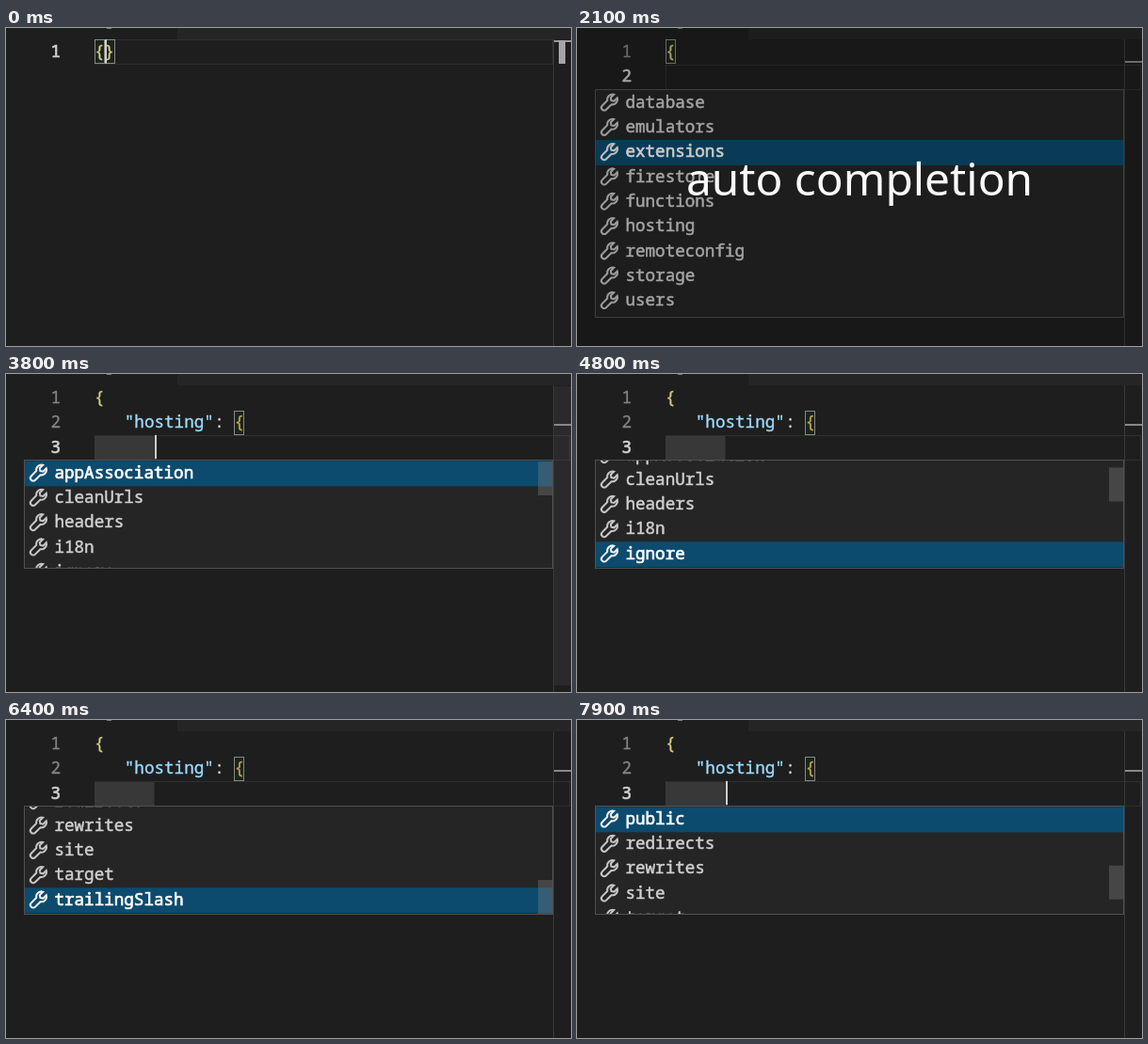
Write an HTML page with a canvas that moves like this. It is 600 px wide and 338 px high and loops after 8000 ms.

```html
<!DOCTYPE html>
<html lang="en">
<head>
<meta charset="utf-8">
<title>Auto completion</title>
<style>
html, body { margin: 0; width: 100%; height: 100%; overflow: hidden; background: #1e1e1e; }
canvas { display: block; width: 600px; height: 338px; }
</style>
</head>
<body>
<canvas id="stage" width="600" height="338"></canvas>
<script>
const ctx = document.getElementById('stage').getContext('2d');
const LOOP = 8000, LINE = 26.3, CHAR = 10.6, LEFT = 94, TOP = 12.3, BASE = 18.7;
const MONO = '17.6px "Noto Sans Mono", monospace';
const GOLD = '#d6cb80', AMBER = '#c9a24e', KEY = '#9cdcfe', PLAIN = '#d4d4d4';

const SECTIONS = ['database', 'emulators', 'extensions', 'firestore', 'functions',
  'hosting', 'remoteconfig', 'storage', 'users'];
const OPTIONS = ['appAssociation', 'cleanUrls', 'headers', 'i18n', 'ignore', 'postdeploy',
  'predeploy', 'public', 'redirects', 'rewrites', 'site', 'target', 'trailingSlash'];

// Times of the arrow key presses
const SECTION_DOWN = [1500, 1900, 2200, 2400, 2500];
const DOWN = [4000, 4300, 4500, 4700, 5000, 5200, 5400, 5500, 5800, 6000, 6200, 6300];
const UP = [6700, 6900, 7100, 7300, 7600];
const ENTER = 300, OPEN = 900, ACCEPT = 2700, BRACE = 2900, SPLIT = 3200, REOPEN = 3500;

const wrench = new Path2D('M14.8 4.2L12 7L9.5 6.5L9 4L11.8 1.2A4.6 4.6 0 0 0 6 6.4' +
  'L1.5 11A2.1 2.1 0 0 0 5 14.5L9.6 10A4.6 4.6 0 0 0 14.8 4.2Z');

const clamp = v => Math.max(0, Math.min(1, v));
const ramp = (t, from, to) => clamp((t - from) / (to - from));
const pulse = (t, a, b, c, d) => ramp(t, a, b) * (1 - ramp(t, c, d));
const countPast = (times, t) => times.filter(k => t >= k).length;
const colX = col => LEFT + col * CHAR;
const lineY = line => TOP + (line - 1) * LINE;

function rect(x, y, w, h, color) {
  ctx.fillStyle = color;
  ctx.fillRect(x, y, w, h);
}

function frame(x, y, w, h, color) {
  ctx.strokeStyle = color;
  ctx.lineWidth = 1;
  ctx.strokeRect(Math.round(x) + 0.5, Math.round(y) + 0.5, Math.round(w), Math.round(h));
}

function text(str, x, y, color, weight = 0.35) {
  ctx.font = MONO;
  ctx.fillStyle = ctx.strokeStyle = color;
  ctx.lineWidth = weight;
  ctx.fillText(str, x, y);
  ctx.strokeText(str, x, y);
}

function code(line, col, str, color) {
  text(str, colX(col), lineY(line) + BASE, color);
}

function brace(line, col, str, color, boxed) {
  if (boxed) {
    rect(colX(col), lineY(line), CHAR, LINE, 'rgba(0,100,0,.1)');
    frame(colX(col), lineY(line), CHAR - 1, LINE - 1, '#888');
  }
  code(line, col, str, color);
}

function cursor(line, col) {
  rect(Math.round(colX(col)), lineY(line), 2, LINE - 1, '#d0d0d0');
}

function drawChrome(t, current, lines) {
  rect(0, 0, 600, 338, '#1e1e1e');
  rect(182, 0, 418, 12, '#252526');
  rect(107, 0, 5, 1, '#777');
  const right = t < OPEN ? 580 : 598;
  frame(LEFT, lineY(current), right - LEFT, LINE, '#2f2f2f');
  for (let i = 1; i <= lines; i++) {
    const active = i === current;
    text(i, 47.4, lineY(i) + BASE, active ? '#d0d0d0' : '#858585', active ? 0.7 : 0.3);
  }
}

function drawMinimap(t) {
  rect(581, 12, 1, 326, '#3a3a3a');
  const slider = 0.24 * pulse(t, 200, 400, 1200, 1700) + 0.13 * pulse(t, 2800, 3000, 3900, 4400);
  rect(582, 13, 18, 318, `rgba(121,121,121,${slider})`);
  if (t < ENTER) {
    rect(582, 13, 18, 2, '#999');
    rect(587, 13, 7, 25, '#a5a5a5');
  } else {
    rect(582, t < SPLIT ? 35 : 53, 18, 2, '#888');
  }
}

function drawCode(t) {
  if (t < ENTER) {
    brace(1, 0, '{', GOLD, true);
    brace(1, 1, '}', GOLD, true);
    cursor(1, 1);
    return;
  }
  const outerBoxed = t < ACCEPT;
  brace(1, 0, '{', GOLD, outerBoxed);
  if (t < SPLIT) brace(3, 0, '}', GOLD, outerBoxed);
  if (t < ACCEPT) return;

  code(2, 3, '"hosting"', KEY);
  code(2, 12, ':', PLAIN);
  if (t < BRACE) {
    cursor(2, 14);
    return;
  }
  brace(2, 14, '{', AMBER, true);
  if (t < SPLIT) {
    brace(2, 15, '}', AMBER, true);
    cursor(2, 15);
    return;
  }
  brace(4, 3, '}', AMBER, true);
  brace(5, 0, '}', GOLD, false);
  rect(LEFT, lineY(3) + 1, 6 * CHAR, LINE - 1, '#383838');
  const blink = (t + 4450) % 800 < 400;
  if (t < REOPEN || blink) cursor(3, 6);
}

function drawPopup(items, selected, top, bottom, scroll = 0) {
  rect(19, top, 562, bottom - top, '#252526');
  ctx.save();
  ctx.beginPath();
  ctx.rect(20, top + 1, 560, bottom - top - 1);
  ctx.clip();
  items.forEach((label, i) => {
    const y = top + 1.4 + i * LINE - scroll;
    if (y > bottom || y + LINE < top) return;
    const active = i === selected;
    if (active) rect(20, y, 560, LINE + 0.6, '#0c4b6e');
    ctx.save();
    ctx.translate(25, y + 2.9);
    ctx.scale(1.2, 1.2);
    ctx.strokeStyle = active ? '#f0f0f0' : '#c5c5c5';
    ctx.lineWidth = 1.7;
    ctx.stroke(wrench);
    ctx.restore();
    text(label, 51.4, y + 18.4, active ? '#fff' : '#d0d0d0', active ? 0.7 : 0.5);
  });
  ctx.restore();
  frame(19, top, 561, bottom - top, '#505050');
}

function drawOptions(t) {
  const top = 91, bottom = 206, view = 112.2;
  let selected = 0, scroll = 0;
  const reveal = i => {
    selected = i;
    scroll = Math.min(i * LINE, Math.max(scroll, (i + 1) * LINE - view));
  };
  const downs = countPast(DOWN, t), ups = countPast(UP, t);
  for (let i = 1; i <= downs; i++) reveal(i);
  for (let i = 1; i <= ups; i++) reveal(downs - i);
  drawPopup(OPTIONS, selected, top, bottom, scroll);
  const total = OPTIONS.length * LINE;
  rect(565, 93 + scroll / (total - view) * 77, 15, 36, 'rgba(121,121,121,.4)');
}

function drawTitle(t) {
  const alpha = pulse(t, 100, 700, 2200, 2800);
  if (!alpha) return;
  rect(0, 0, 600, 338, `rgba(0,0,0,${0.21 * alpha})`);
  ctx.font = '47.8px "Noto Sans", sans-serif';
  ctx.textAlign = 'center';
  ctx.fillStyle = `rgba(250,250,250,${alpha})`;
  ctx.fillText('auto completion', 300, 178);
  ctx.textAlign = 'left';
}

function draw(t) {
  const current = t < ENTER ? 1 : t < SPLIT ? 2 : 3;
  drawChrome(t, current, t < ENTER ? 1 : t < SPLIT ? 3 : 5);
  drawMinimap(t);
  drawCode(t);
  if (t >= OPEN && t < ACCEPT) {
    drawPopup(SECTIONS, countPast(SECTION_DOWN, t), 65, 307);
  }
  if (t >= REOPEN) drawOptions(t);
  drawTitle(t);
}

const start = performance.now();
function tick() {
  draw((performance.now() - start) % LOOP);
  requestAnimationFrame(tick);
}
tick();
</script>
</body>
</html>
```
